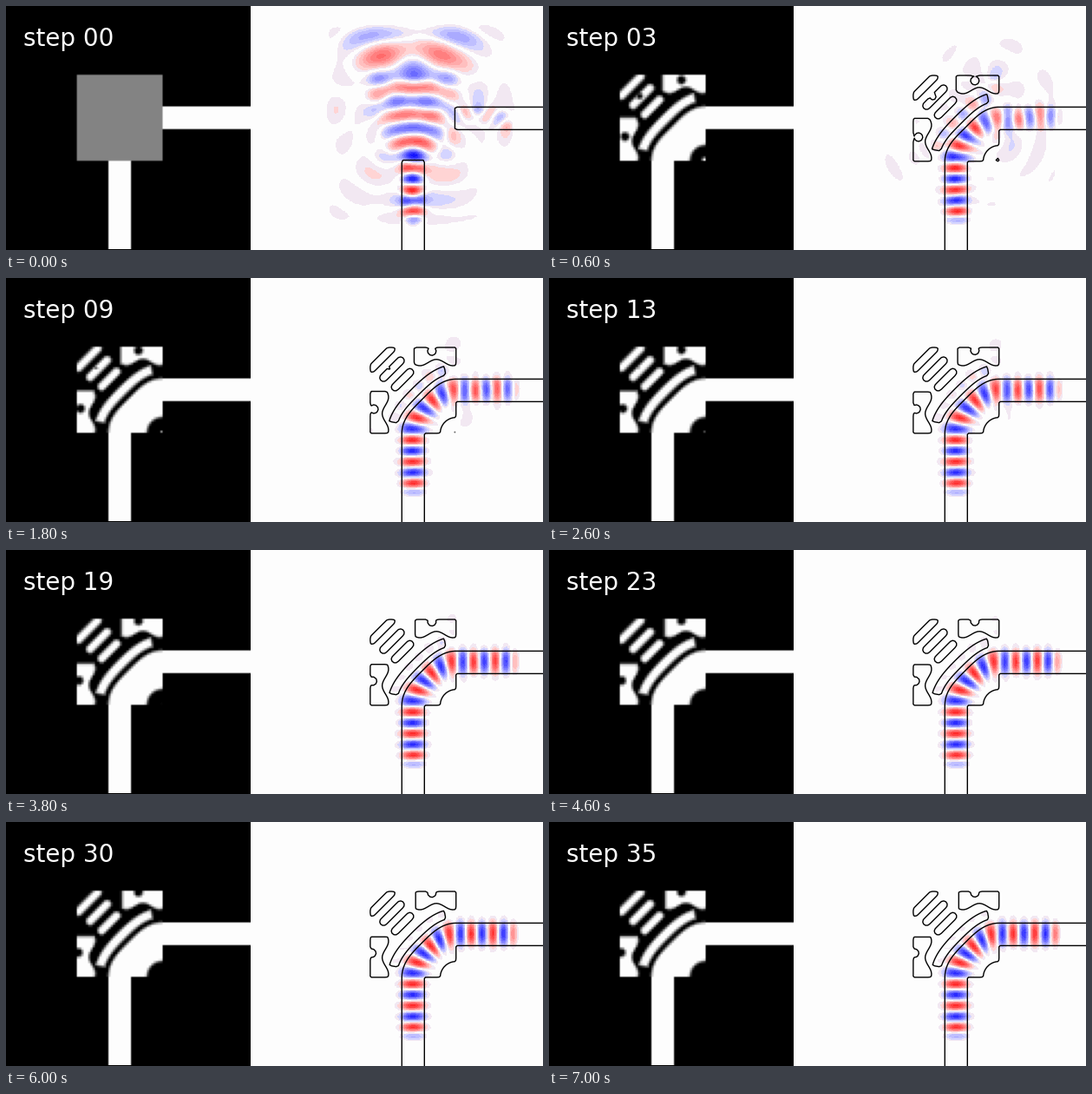
A matplotlib script that plays this animation: 619 px wide and 281 px high, repeating every 7200 ms.

```python
import numpy as np
import matplotlib.pyplot as plt
from matplotlib.animation import FuncAnimation
from matplotlib.colors import LinearSegmentedColormap, ListedColormap
from matplotlib.patches import Rectangle

W, H = 619, 281
STEPS, INTERVAL = 36, 200

# Simulation grid; all geometry is measured in cells
N = 108
CELL = H / N
PML = 20
LOW, HIGH = 31, 69
BOX = slice(LOW, HIGH)
GUIDE = slice(45, 55)
MID = 50
SOURCE_ROW = 86
K2 = (2 * np.pi * 40 / 1280) ** 2
EPS_LOW, EPS_HIGH = 2.25, 12.25

# Panel placement, in pixels
X_OFF, Y_OFF, RIGHT = 1.2, -0.7, 338
PAPER = "#fdfdfd"
VMAX = 1.2

U, V = np.meshgrid(np.arange(N) + 0.5, np.arange(N) + 0.5)
# Polar coordinates around the inner corner of the bend
RHO = np.hypot(HIGH - U, HIGH - V)
THETA = np.arctan2(HIGH - V, HIGH - U)
SAG = np.sin(2 * THETA) ** 2


# ---- geometry of the design region (signed distance, positive inside) ----

def disc(u, v, radius):
    return radius - np.hypot(U - LOW - u, V - LOW - v)


def bar(centre, half, radius):
    across = (U + V - 2 * (LOW + centre)) / np.sqrt(2)
    along = np.abs(U - V) / np.sqrt(2)
    return radius - np.hypot(across, np.maximum(along - half, 0))


def lobe(grow):
    """Lump with a wavy rim and a hole, at the top right of the design."""
    u, v = U - LOW, V - LOW
    rim = 6.7 + 1.4 * np.cos(2 * np.pi * (u - 22) / 14.6)
    body = np.minimum(u - 19 - 1.3 * grow, rim - v)
    return np.minimum(body, -disc(27.3, 2.3 - 1.9 * grow, 1.9))


def design(grow):
    edge = 24 - (2.9 - 0.4 * grow) * SAG
    bend = np.minimum(edge - RHO, RHO - 7)
    offset = 4.6 - 0.3 * grow
    crescent = np.minimum(1.95 - np.abs(RHO - edge - offset),
                          RHO * (np.radians(35) - np.abs(THETA - np.pi / 4)))
    bars = np.max([bar(5 + 4.65 * k, 6 - 0.7 * k, 1.7) for k in range(3)], axis=0)
    bars = np.minimum(bars, -disc(8.7, 9.4, 1.4 - 3 * grow))
    corner = lobe(grow)
    speck = disc(37.5, 37.5, 0.85 - 2.3 * grow)
    return np.max([bend, crescent, bars, corner, corner.T, speck], axis=0)


def density(step):
    rho = np.zeros((N, N))
    rho[HIGH:, GUIDE] = 1
    rho[GUIDE, HIGH:] = 1
    grow = 1 - np.exp(-max(step - 3, 0) / 14)
    shape = np.clip(0.5 + design(grow) / 1.5, 0, 1)
    sharp = 1 - (1 - min(step / 3, 1)) ** 2
    rho[BOX, BOX] = 0.499 + (shape[BOX, BOX] - 0.499) * sharp
    return rho


# ---- wave solver: rows are eliminated block by block ----

def depth(pos):
    return np.maximum(0, np.maximum(PML - pos, pos - (N - PML))) / PML


def stretch(pos):
    return 1 + 1j * 60 / PML / np.sqrt(K2) * depth(pos) ** 3


def laplacian():
    centre = stretch(np.arange(N) + 0.5)
    edge = stretch(np.arange(N + 1.0))
    up, down = 1 / (centre * edge[1:]), 1 / (centre * edge[:-1])
    return np.diag(-up - down) + np.diag(up[:-1], 1) + np.diag(down[1:], -1)


LAP = laplacian()


def permittivity(rho):
    return EPS_LOW + (EPS_HIGH - EPS_LOW) * rho


def block(j, eps):
    return LAP + np.diag(LAP[j, j] + K2 * eps[j])


def guide_mode():
    eps = np.full(N, EPS_LOW)
    eps[GUIDE] = EPS_HIGH
    line = np.diag(K2 * eps - 2) + np.eye(N, k=1) + np.eye(N, k=-1)
    values, vectors = np.linalg.eigh(line)
    profile = np.abs(vectors[:, -1])
    return np.arccos(1 - values[-1] / 2), profile / profile.max()


BETA, MODE = guide_mode()


def sweep_down(inverses, rows, eps):
    for j in rows:
        a = block(j, eps)
        if j:
            a = a - LAP[j, j - 1] * LAP[j - 1, j] * inverses[j - 1]
        inverses[j] = np.linalg.inv(a)


def sweep_up(eps):
    """Eliminate the rows below the design, which hold the source."""
    inverses, loads = {}, {}
    for j in range(N - 1, HIGH - 1, -1):
        a = block(j, eps)
        load = np.zeros(N, complex)
        if j == SOURCE_ROW:
            load += -2j * np.sin(BETA) * MODE
        if j < N - 1:
            a = a - LAP[j, j + 1] * LAP[j + 1, j] * inverses[j + 1]
            load = load - LAP[j, j + 1] * inverses[j + 1] @ loads[j + 1]
        inverses[j], loads[j] = np.linalg.inv(a), load
    return inverses, loads


eps_start = permittivity(density(0))
above = {}
sweep_down(above, range(LOW), eps_start)
below, loads = sweep_up(eps_start)


def solve(rho):
    eps = permittivity(rho)
    inverses = dict(above)
    last = HIGH - 1
    sweep_down(inverses, range(LOW, last), eps)
    a = (block(last, eps)
         - LAP[last, last - 1] * LAP[last - 1, last] * inverses[last - 1]
         - LAP[last, last + 1] * LAP[last + 1, last] * below[last + 1])
    load = -LAP[last, last + 1] * below[last + 1] @ loads[last + 1]
    field = np.zeros((N, N), complex)
    field[last] = np.linalg.solve(a, load)
    for j in range(last, 0, -1):
        field[j - 1] = -LAP[j - 1, j] * inverses[j - 1] @ field[j]
    for j in range(last + 1, N):
        field[j] = below[j] @ (loads[j] - LAP[j, j - 1] * field[j - 1])
    return field


def guided(step):
    """Lossless wave that follows the guide around the bend."""
    start = SOURCE_ROW + 0.5
    trough = 83.7 - 0.104 * step
    turn = 6 * 2 * np.pi / BETA - (start - HIGH) - (trough - HIGH)

    path = start - HIGH + turn * THETA / (np.pi / 2)
    side = RHO - 19 + 1.9 * SAG
    after, before = U > HIGH, V > HIGH
    path = np.where(after, start - HIGH + turn + U - HIGH, path)
    side = np.where(after, V - MID, side)
    path = np.where(before, np.abs(V - start), path)
    side = np.where(before, U - MID, side)

    profile = np.interp(side, np.arange(N) + 0.5 - MID, MODE)
    fade = np.exp(-49 * np.maximum(depth(U), depth(V)) ** 4)
    return -np.exp(1j * BETA * path) * profile * fade


def wave(step, rho):
    """The scattered share dies out as the device improves."""
    loss = (1 + step) ** -0.65
    return (loss * solve(rho) + (1 - loss) * guided(step)).real


densities = [density(s) for s in range(STEPS)]
waves = [wave(s, rho) for s, rho in enumerate(densities)]


# ---- drawing ----

def banded_colours():
    v = np.linspace(-1, 1, 512)
    q = np.round(v * 12) / 12
    rgb = np.column_stack([1 + np.minimum(q, 0), 1 - np.abs(q), 1 - np.maximum(q, 0)])
    rgb[np.abs(v) < 0.125] = (0.95, 0.91, 0.95)
    rgb[np.abs(v) < 0.06] = 253.5 / 255
    return ListedColormap(rgb)


fig = plt.figure(figsize=(W / 100, H / 100), dpi=100, facecolor=PAPER)
ax = fig.add_axes([0, 0, 1, 1])
ax.set_xlim(0, W)
ax.set_ylim(H, 0)
ax.axis("off")
ax.add_patch(Rectangle((0, 0), 282, H, color="black", lw=0, zorder=0))


def panel(data, left, **style):
    extent = [left + X_OFF, left + X_OFF + H, H + Y_OFF, Y_OFF]
    return ax.imshow(data, extent=extent, aspect="auto", interpolation="hanning",
                     interpolation_stage="data", zorder=1, **style)


greys = LinearSegmentedColormap.from_list("greys", ["#000000", "#848484", PAPER])
mask = panel(densities[0], 0, cmap=greys, vmin=0, vmax=1)
glow = panel(waves[0], RIGHT, cmap=banded_colours(), vmin=-VMAX, vmax=VMAX)
label = ax.text(20.3, 46, "", color=PAPER, fontsize=20,
                family="DejaVu Sans", va="baseline", zorder=3)
# One extra cell on each side carries the outline to the stage border
grid = (np.arange(-1, N + 1) + 0.5) * CELL
outlines = []


def draw(step):
    while outlines:
        outlines.pop().remove()
    mask.set_data(densities[step])
    glow.set_data(waves[step])
    outlines.append(ax.contour(grid + X_OFF + RIGHT, grid + Y_OFF,
                               np.pad(densities[step], 1, mode="edge"),
                               levels=[0.5], colors="black", linewidths=1, zorder=2))
    label.set_text(f"step {step:02d}")
    return mask, glow, label


anim = FuncAnimation(fig, draw, frames=STEPS, interval=INTERVAL,
                     init_func=lambda: draw(0), repeat=True, repeat_delay=0)
plt.show()
```
